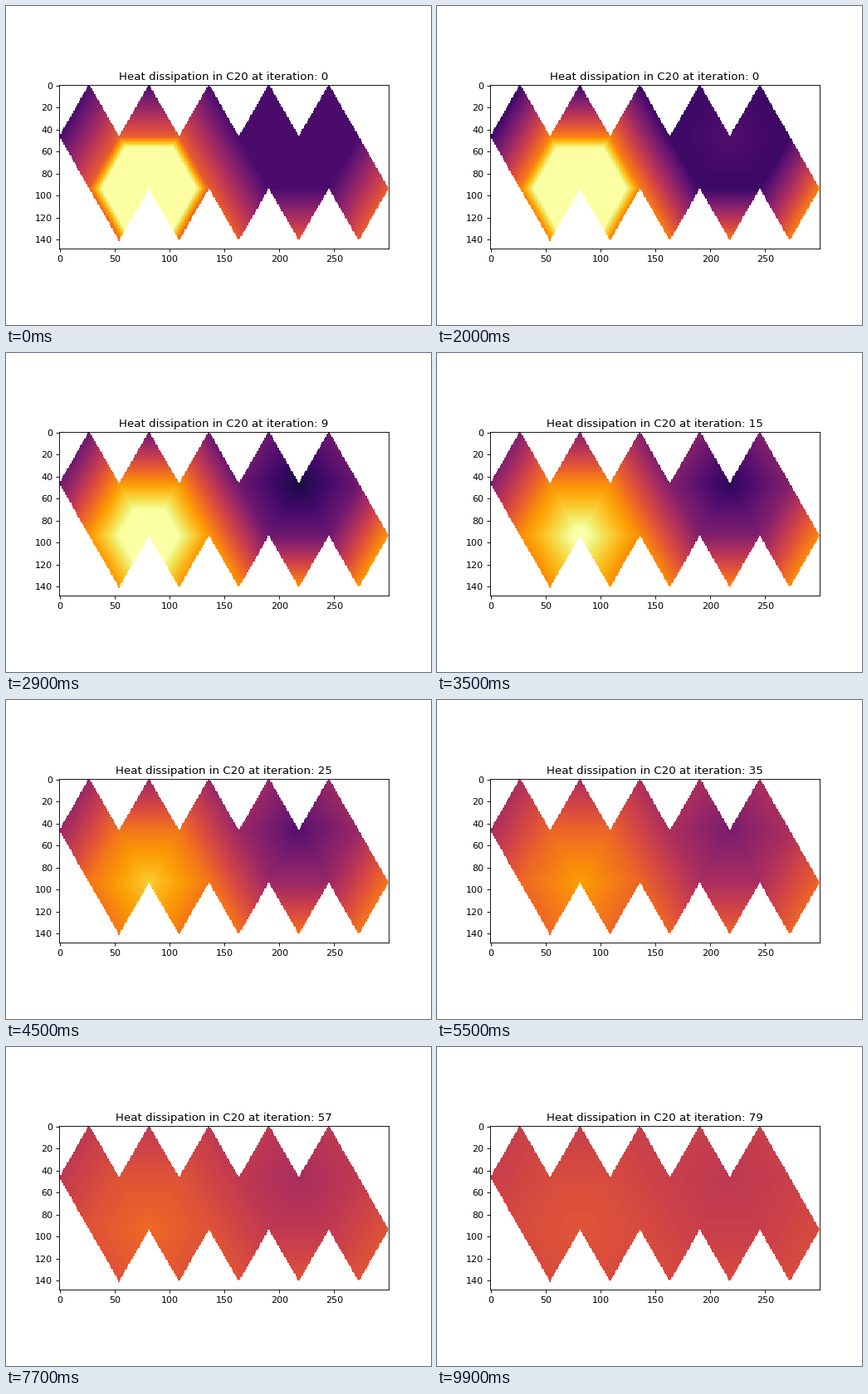
These frames come from a looping animation (512x384 px, 10 s). A matplotlib script:

```python
import numpy as np
import matplotlib.pyplot as plt
from matplotlib.animation import FuncAnimation

COLS, ROWS = 300, 149
SIDE = COLS / 5.5
TRI_H = SIDE * np.sqrt(3) / 2
HOLD, STEPS = 20, 80

# Shell of each net vertex: 0 hot spot, 1 and 2 the rings, 3 its antipode
SHELLS = np.array([
    [2, 2, 2, 2, 2, 2],
    [2, 1, 1, 2, 3, 2],
    [1, 0, 1, 2, 2, 1],
    [1, 1, 1, 1, 1, 1],
])

# Laplacian eigenmodes of the icosahedron, one value per shell
R5 = 1 / np.sqrt(5)
MODES = np.array([
    [1, 1, 1, 1],
    [1, R5, -R5, -1],
    [1, -0.2, -0.2, 1],
    [1, -R5, R5, -1],
])
AMPS = np.array([0.56, 0.727, 0.535, 0.132])
RATES = np.array([0, 0.0335, 0.185, 0.23])
START = np.array([2.35, 0.64, 0.22, 0.22])


def shell_weights():
    """Barycentric weight of each shell at every pixel, NaN off the net."""
    y, x = np.mgrid[:ROWS, :COLS] + 0.5
    v = y / TRI_H
    q = x / SIDE - v / 2 + 0.5
    i, j = np.floor(q).astype(int), np.floor(v).astype(int)
    fq, fv = q - i, v - j
    upper = fq + fv < 1
    inside = (i >= 0) & (i < 5) & (j < 3)
    inside &= ~((j == 0) & upper) & ~((j == 2) & ~upper)
    i, j = np.clip(i, 0, 4), np.clip(j, 0, 2)

    layers = []
    for shell in range(4):
        on = (SHELLS == shell).astype(float)
        a, b = on[j, i], on[j, i + 1]
        c, d = on[j + 1, i], on[j + 1, i + 1]
        w = np.where(upper,
                     a + fq * (b - a) + fv * (c - a),
                     d + (1 - fq) * (c - d) + (1 - fv) * (b - d))
        layers.append(np.where(inside, w, np.nan))
    return np.array(layers)


WEIGHTS = shell_weights()


def heat(values):
    return np.ma.masked_invalid(np.tensordot(values, WEIGHTS, axes=1))


fig = plt.figure(figsize=(6.4, 4.8), dpi=80, facecolor="white")
ax = fig.add_axes([0.125, 0.11, 0.775, 0.77])
image = ax.imshow(heat(START), cmap="inferno", vmin=0, vmax=1,
                  interpolation="nearest")
ax.set_xticks(range(0, 300, 50))
ax.set_yticks(range(0, 141, 20))
title = ax.set_title("")


def update(k):
    n = max(k - HOLD, 0)
    values = START if k < HOLD else (AMPS * np.exp(-RATES * n)) @ MODES
    image.set_data(heat(values))
    title.set_text(f"Heat dissipation in C20 at iteration: {n}")
    return image, title


anim = FuncAnimation(fig, update, frames=HOLD + STEPS, interval=100,
                     repeat=True, blit=False)
plt.show()
```
